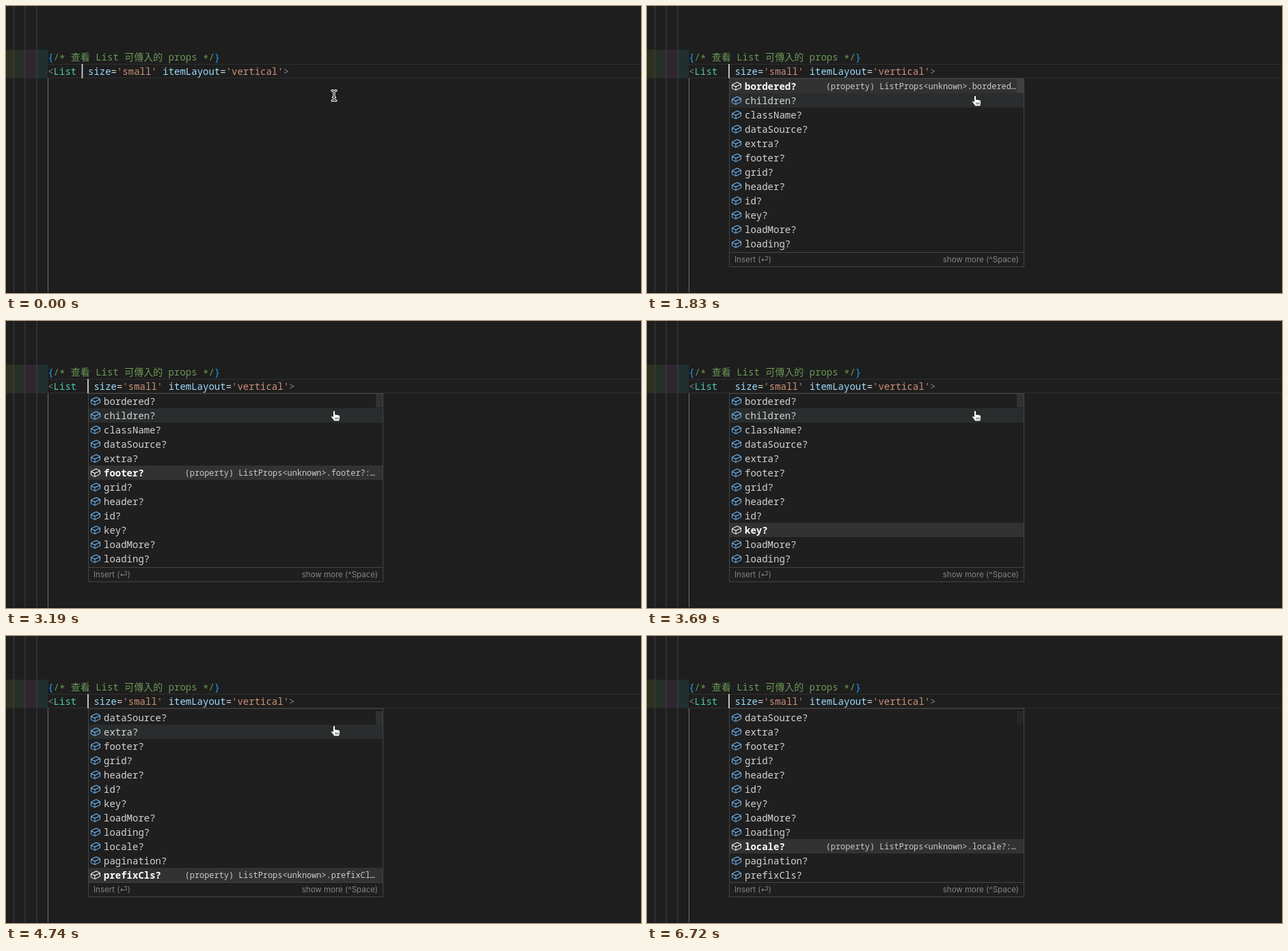
An HTML page that plays this animation: 929x421 px, repeating every 7.19 s.

```html
<!DOCTYPE html>
<html lang="zh-Hant">
<head>
<meta charset="utf-8">
<title>List props</title>
<style>
html, body { margin: 0; width: 100%; height: 100%; overflow: hidden; background: #1e1e1e; }
svg { display: block; }
text { white-space: pre; }
.code { font: 14px 'Noto Sans Mono', 'Noto Sans CJK TC', 'Noto Sans CJK', monospace; }
.detail { font: 11.9px 'Noto Sans Mono', monospace; fill: #ccc; }
.foot { font: 11.5px Inter, 'DejaVu Sans', sans-serif; fill: #848484; }
.row text.code { fill: #d4d4d4; }
.row path { fill: #75beff; }
.row.on text.code { fill: #fff; font-weight: 600; }
.row.on path { fill: #fff; }
</style>
</head>
<body>
<svg id="stage" width="929" height="421" viewBox="0 0 929 421">
  <clipPath id="view"><rect x="121" y="107" width="430" height="254"/></clipPath>
  <rect width="929" height="421" fill="#1e1e1e"/>
  <g id="indent"></g>
  <path d="M61 85.5H929M61 105.5H929" stroke="#303030"/>
  <path d="M11.5 0V421M28 0V421M45 0V421" stroke="#404040"/>
  <path d="M61.5 106V421" stroke="#707070"/>
  <rect y="420" width="929" height="1" fill="#171717"/>

  <text class="code" x="61.2" y="79.5" fill="#6a9955"><tspan fill="#179fff">{</tspan>/<tspan dy="2">*</tspan><tspan dy="-2"> 查看 List 可傳入的 props </tspan><tspan dy="2">*</tspan><tspan dy="-2">/</tspan><tspan fill="#179fff">}</tspan></text>
  <text class="code" x="61.2" y="100.5" fill="#808080">&lt;<tspan fill="#4ec9b0">List</tspan></text>
  <text class="code" id="attrs" y="100.5" fill="#d4d4d4"><tspan fill="#9cdcfe">size</tspan>=<tspan fill="#ce9178">'small'</tspan> <tspan fill="#9cdcfe">itemLayout</tspan>=<tspan fill="#ce9178">'vertical'</tspan><tspan fill="#808080">&gt;</tspan></text>
  <rect id="caret" y="85" width="1.8" height="21" fill="#d0d0d0"/>

  <g id="popup">
    <rect x="120.5" y="106.5" width="431" height="276" fill="#1f1f1f" stroke="#454545"/>
    <g clip-path="url(#view)">
      <rect id="hover" x="121" width="430" height="21" fill="#2a2d2e"/>
      <rect id="pick" x="121" width="430" height="21" fill="#323232"/>
      <g id="rows"></g>
      <text class="detail" id="detail" x="261.7"></text>
    </g>
    <rect id="slider" x="541" width="10" height="20" fill="#70787f"/>
    <path d="M121 361.5H551" stroke="#454545"/>
    <text class="foot" x="128" y="376">Insert (⏎)</text>
    <text class="foot" x="544" y="376" text-anchor="end">show more (^Space)</text>
  </g>

  <g id="beam" fill="none" stroke-linecap="round">
    <path stroke="#fff" stroke-width="3.2" d="M-3-7.3Q0-7.3 0-5.3V5.3Q0 7.3-3 7.3M3-7.3Q0-7.3 0-5.3M0 5.3Q0 7.3 3 7.3M-1.5 2.5H1.5"/>
    <path stroke="#111" stroke-width="1.1" d="M-3-7.3Q0-7.3 0-5.3V5.3Q0 7.3-3 7.3M3-7.3Q0-7.3 0-5.3M0 5.3Q0 7.3 3 7.3M-1.5 2.5H1.5"/>
  </g>
  <g id="hand" stroke="#111" stroke-width=".8" stroke-linejoin="round">
    <path fill="#fff" d="M-1.5 1.4q0-1.5 1.5-1.5t1.5 1.5V5.8q1.6-.9 2.5.3q1.5-.7 2.4.5q1.7-.4 2.1 1.2V11q0 2-1.2 4.4H.2L-4 9.8q-1-1.9.6-2.1q1 .1 1.9 1.4Z"/>
    <path d="M2 10v3M4 10v3M6 10v3"/>
  </g>
</svg>
<script>
const LOOP = 7190, ROW = 21, TOP = 107, VIEW = 254;
const NAMES = ('bordered children className dataSource extra footer grid header id key ' +
  'loadMore loading locale pagination prefixCls').split(' ');
const CUBE = 'M14.45 4.5l-5-2.5h-.9l-7 3.5-.55.89v4.5l.55.9 5 2.5h.9l7-3.5.55-.9v-4.5l-.55-.89z' +
  'm-8 8.64l-4.5-2.25V7.17l4.5 2v3.97zm.5-4.8L2.29 6.23l6.66-3.34 4.67 2.34-6.67 3.11z' +
  'm7 1.55l-6.5 3.25V9.21l6.5-3v3.68z';

const TYPED = 830, OPEN = 1660, HOVER = 1780;
const BLINKS = [500, 830, 1360, 1830, 2370, 2870, 3370, 3810, 4240, 4740, 5210, 5720, 6250, 6720];
const DOWN = [2610, 2730, 2850, 2970, 3090, 3430, 3520, 3610, 3690, 3750, 3870, 4100, 4190, 4280];
const UP = [4790, 4910];
// time, x, y of the pointer
const PATH = [
  [5180, 480, 131.5], [5270, 430, 185], [5330, 350, 216], [5375, 305, 205], [5430, 272.5, 155],
  [5500, 285, 95], [5560, 340, 67], [5630, 430, 85], [5700, 505, 140], [5760, 527, 200],
  [5820, 490, 270], [5890, 430, 308], [6110, 430, 308], [6190, 500, 330], [6250, 640, 325],
  [6310, 800, 290], [6360, 960, 260]
];

const $ = id => document.getElementById(id);
const set = (el, attrs) => { for (const k in attrs) el.setAttribute(k, attrs[k]); };
const show = (el, on) => set(el, { visibility: on ? 'inherit' : 'hidden' });
const passed = (list, t) => list.filter(v => v <= t).length;

function add(parent, tag, attrs) {
  const el = document.createElementNS('http://www.w3.org/2000/svg', tag);
  set(el, attrs);
  parent.appendChild(el);
  return el;
}

[[0, 10.8, '#ffff40'], [10.8, 16.8, '#7fff7f'], [27.6, 16.8, '#ff7fff'], [44.4, 16.8, '#4fecec']]
  .forEach(([x, width, fill]) =>
    add($('indent'), 'rect', { x, y: 64, width, height: 42, fill, opacity: .08 }));

const rows = NAMES.map((name, i) => {
  const g = add($('rows'), 'g', { class: 'row', transform: `translate(0 ${TOP + i * ROW})` });
  add(g, 'path', { d: CUBE, transform: 'translate(123 2.5)' });
  add(g, 'text', { class: 'code', x: 143, y: 15.5 }).textContent = name + '?';
  return g;
});

function pointer(t) {
  const s = 5210 + Math.floor((t - 5210) / 55) * 55;
  const i = PATH.findIndex(p => p[0] > s);
  if (i === 0) return PATH[0].slice(1);
  if (i < 0) return PATH[PATH.length - 1].slice(1);
  const a = PATH[i - 1], b = PATH[i], k = (s - a[0]) / (b[0] - a[0]);
  return [a[1] + (b[1] - a[1]) * k, a[2] + (b[2] - a[2]) * k];
}

const inList = ([x, y]) => x > 120 && x < 551 && y > TOP && y < TOP + VIEW;

function detailText(name) {
  return `(property) ListProps<unknown>.${name}?: `.slice(0, 38) + '…';
}

function draw(t) {
  const typed = t >= TYPED, open = t >= OPEN;
  set($('attrs'), { x: typed ? 128.4 : 120 });
  set($('caret'), { x: typed ? 119.1 : 110.6 });
  show($('caret'), passed(BLINKS, t) % 2 === 0);

  const down = passed(DOWN, t), sel = down - passed(UP, t);
  const scroll = Math.max(0, (down + 1) * ROW - VIEW);
  const rowY = i => TOP + i * ROW - scroll;
  const since = t - (down ? DOWN[down - 1] : 1730);

  show($('popup'), open);
  set($('rows'), { transform: `translate(0 ${-scroll})` });
  set($('pick'), { y: rowY(sel) });
  rows.forEach((r, i) => r.setAttribute('class', i === sel ? 'row on' : 'row'));
  $('detail').textContent = detailText(NAMES[sel]);
  set($('detail'), { y: rowY(sel) + 15.3 });
  show($('detail'), open && since >= 100);
  set($('slider'), { y: TOP + scroll * .05, opacity: t < 6300 ? .2 : .08 });

  // the row highlight trails the pointer slightly
  const pos = pointer(t), late = pointer(t - 55);
  const hovering = t >= HOVER && inList(late);
  set($('hover'), { y: rowY(Math.floor((late[1] - TOP + scroll) / ROW)) });
  show($('hover'), hovering);

  const hand = t >= HOVER && inList(pos);
  const at = { transform: `translate(${pos[0]} ${pos[1]})` };
  set($('hand'), at);
  set($('beam'), at);
  show($('hand'), hand);
  show($('beam'), !hand);
}

function tick() {
  draw(performance.now() % LOOP);
  requestAnimationFrame(tick);
}
tick();
</script>
</body>
</html>
```
